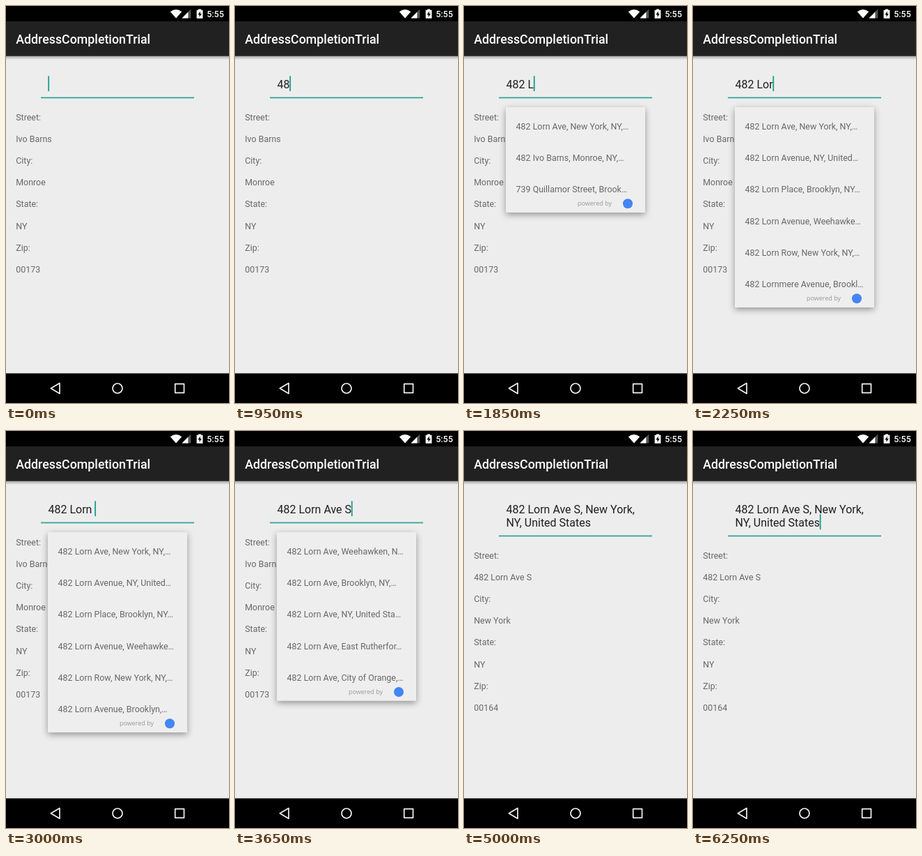
Animation, 320 px wide and 569 px high, one loop 6400 ms. Source, as an HTML page:

```html
<!DOCTYPE html>
<html lang="en">
<head>
<meta charset="utf-8">
<style>
html, body { margin: 0; width: 100%; height: 100%; overflow: hidden; background: #ededed; }
svg { display: block; width: 320px; height: 569px; }
text { font-family: Roboto, sans-serif; white-space: pre; }
#title { font-size: 17.8px; font-weight: 500; fill: #fff; }
#clock { font-size: 12.4px; font-weight: 500; fill: #fff; }
#fields text, #rows text { font-size: 12.45px; fill: #686868; }
#input text { font-size: 16px; fill: #1f1f1f; }
#powered { font-family: "Open Sans", sans-serif; font-size: 9px; fill: #999; }
#card { filter: drop-shadow(0 3px 5px rgba(0, 0, 0, .38)); }
</style>
</head>
<body>
<svg viewBox="0 0 320 569">
  <defs>
    <linearGradient id="shade" x2="0" y2="1">
      <stop offset="0" stop-color="#000" stop-opacity=".32"/>
      <stop offset="1" stop-color="#000" stop-opacity="0"/>
    </linearGradient>
  </defs>
  <rect width="320" height="569" fill="#ededed"/>

  <rect y="71.5" width="320" height="5.5" fill="url(#shade)"/>
  <rect y="22" width="320" height="49.8" fill="#212121"/>
  <rect width="320" height="22" fill="#000"/>
  <text id="title" x="14.2" y="54">AddressCompletionTrial</text>

  <g fill="#fff">
    <path d="M235.8 8.2Q244 1.8 252.2 8.2L244 17.6Z"/>
    <path d="M265.3 4.6V17.4H252.5Z" fill="#555"/>
    <path d="M261.4 8.5V17.4H252.5Z"/>
    <path d="M273.6 5.8H276V4.4H280V5.8H282.4V17.8H273.6Z"/>
    <path d="M278.7 7.5L275.4 12.5H277.5V16L280.7 11H278.7Z" fill="#000"/>
  </g>
  <text id="clock" x="288.3" y="16">5:55</text>

  <g id="input">
    <text id="line1" x="60.5" y="117.8"></text>
    <text id="line2" x="60.5" y="136.6"></text>
  </g>
  <rect id="caret" width="1.8" height="22" rx=".6" fill="#1a9c90"/>
  <rect id="rule" x="50" width="220" height="1.7" fill="#2ba195"/>
  <g id="fields"></g>

  <g id="popup">
    <rect id="card" x="60" y="145" width="200" rx="1" fill="#eee"/>
    <g id="rows"></g>
    <g id="credit">
      <text id="powered" x="163" y="-10">powered by</text>
      <circle cx="235" cy="-12.8" r="7" fill="#4285f4"/>
    </g>
  </g>

  <rect y="526.5" width="320" height="42.5" fill="#000"/>
  <g fill="none" stroke="#f2f2f2" stroke-width="1.7" stroke-linejoin="round">
    <path d="M77 540.6V555.4L64.4 548Z"/>
    <circle cx="160" cy="548" r="7"/>
    <rect x="242.7" y="541.7" width="12.8" height="12.6"/>
  </g>
</svg>
<script>
const LOOP = 6400, BLINK = 250, PICK = 4750, FILL = 5000, FADE = 150;
const $ = id => document.getElementById(id);

// [time, first line, second line]; every step restarts the caret blink
const typed = [
  [0, ""], [500, "4"], [750, "48"], [1000, "482"],
  [1600, "482 "], [1750, "482 L"], [1950, "482 Lo"], [2150, "482 Lor"],
  [2400, "482 Lorn"], [2800, "482 Lorn "], [3100, "482 Lorn A"],
  [3250, "482 Lorn Av"], [3350, "482 Lorn Ave"], [3500, "482 Lorn Ave "],
  [3600, "482 Lorn Ave S"],
  [PICK, "482 Lorn Ave S, New York,", "NY, United States"]
];

const street = [
  "482 Lorn Ave, New York, NY,…", "482 Lorn Avenue, NY, United…",
  "482 Lorn Place, Brooklyn, NY…", "482 Lorn Avenue, Weehawke…",
  "482 Lorn Row, New York, NY,…"
];
const avenue = [
  "482 Lorn Ave, Weehawken, N…", "482 Lorn Ave, Brooklyn, NY,…",
  "482 Lorn Ave, NY, United Sta…", "482 Lorn Ave, East Rutherfor…"
];
const lists = [
  [1250, [street[0], "482 Ivo Barns, Monroe, NY,…", "739 Quillamor Street, Brook…"]],
  [2050, [...street, "482 Lornmere Avenue, Brookl…"]],
  [2750, [...street, "482 Lorn Avenue, Brooklyn,…"]],
  [3500, [...avenue, "482 Lorn Ave, City of Orange,…"]],
  [4100, [...avenue, "482 Lorn Ave S, New York, N…"]]
];

const labels = ["Street:", "City:", "State:", "Zip:"];
const places = [
  [0, ["Ivo Barns", "Monroe", "NY", "00173"]],
  [FILL, ["482 Lorn Ave S", "New York", "NY", "00164"]]
];

function addTexts(parent, count, x, y, pitch) {
  return Array.from({ length: count }, (_, i) => {
    const el = document.createElementNS("http://www.w3.org/2000/svg", "text");
    el.setAttribute("x", x);
    el.setAttribute("y", y + i * pitch);
    return parent.appendChild(el);
  });
}

const fields = addTexts($("fields"), 8, 14.2, 163.8, 31.15);
const rows = addTexts($("rows"), 6, 74.6, 176.5, 45.35);
labels.forEach((s, i) => setText(fields[2 * i], s));

function setText(el, s) {
  if (el.textContent !== s) el.textContent = s;
}

const at = (steps, t) => steps.filter(s => s[0] <= t).pop();
const clamp = v => Math.max(0, Math.min(1, v));

function drawInput(t) {
  const [start, first, second = ""] = at(typed, t);
  const drop = second ? 19 : 0;
  setText($("line1"), first);
  setText($("line2"), second);
  const line = second ? $("line2") : $("line1");
  const end = line.textContent ? line.getComputedTextLength() : 0;
  const on = Math.floor((t - start) / BLINK) % 2 === 0;
  $("caret").setAttribute("x", 60.3 + end);
  $("caret").setAttribute("y", 100.2 + drop);
  $("caret").setAttribute("visibility", on ? "visible" : "hidden");
  $("rule").setAttribute("y", 130.6 + drop);
  $("fields").setAttribute("transform", `translate(0 ${drop})`);
}

function drawPopup(t) {
  const items = (at(lists, t) || lists[0])[1];
  const height = items.length * 45.35 + 15;
  rows.forEach((el, i) => setText(el, items[i] || ""));
  $("card").setAttribute("height", height);
  $("credit").setAttribute("transform", `translate(0 ${145 + height})`);
  const shown = clamp((t - lists[0][0]) / FADE) * clamp(1 - (t - PICK) / FADE);
  $("popup").style.opacity = shown;
  $("popup").style.display = shown ? "" : "none";
}

function render(t) {
  drawInput(t);
  drawPopup(t);
  at(places, t)[1].forEach((s, i) => setText(fields[2 * i + 1], s));
}

const begin = performance.now();
function tick() {
  render((performance.now() - begin) % LOOP);
  requestAnimationFrame(tick);
}
tick();
</script>
</body>
</html>
```
